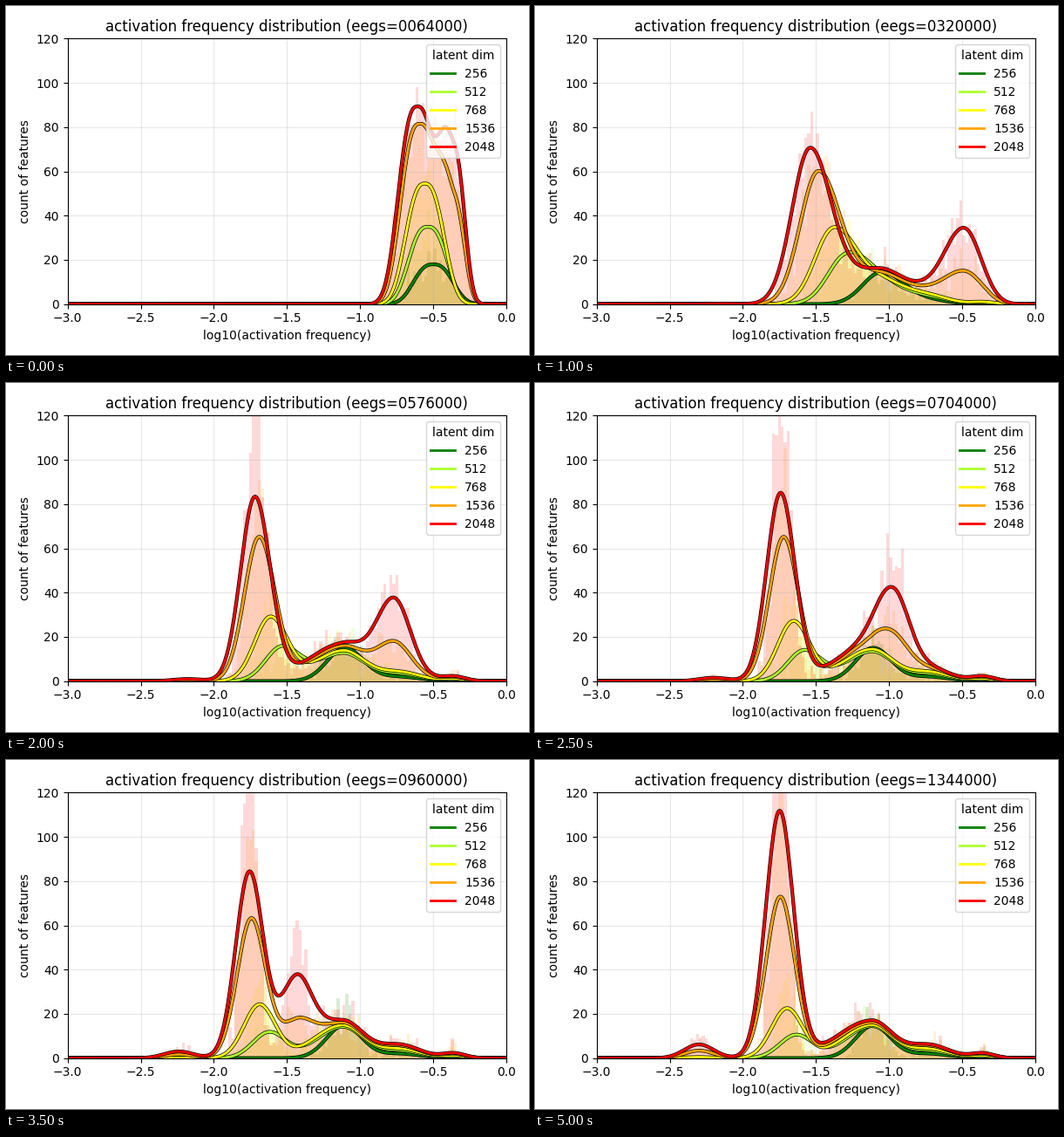
A matplotlib script for the animation above (5250 ms loop, 600 by 400 pixels).

```python
import numpy as np
import matplotlib.pyplot as plt
from matplotlib.animation import FuncAnimation

FRAMES, INTERVAL = 21, 250
EDGES = np.linspace(-3, 0, 151)
MIDS = (EDGES[:-1] + EDGES[1:]) / 2
X = np.linspace(-3, 0, 500)

# latent dim, colour, resting place and time constant of the main cluster,
# its area at start and end, height of the middle and the late cluster
SERIES = [
    (256, "green", -1.11, 1.7, 2.3, 1.75, 0, (0, 0)),
    (512, "greenyellow", -1.64, 3.4, 4.4, 1.1, 14.5, (0, 0)),
    (768, "yellow", -1.70, 3.1, 6.8, 2.3, 15, (0, 0)),
    (1536, "orange", -1.75, 2.7, 10.0, 5.9, 16, (46, 12)),
    (2048, "red", -1.76, 2.4, 10.9, 7.7, 17, (70, 31)),
]


def decay(start, end, t, tau):
    return end + (start - end) * np.exp(-t / tau)


def clusters(series, t):
    """Centre, height, left and right width of every cluster at step t."""
    n, _, rest, tau, area0, area1, mid, late = series
    size = np.log2(n / 256) / 3

    base = .12 - .026 * size
    left = base + (.13 - base) * np.exp(-((t - 2) / 4) ** 2)
    right = left + .04 * t * np.exp(-t / 2)
    main = (decay(-.5 - .11 * size, rest, t, tau),
            2 * decay(area0, area1, t, 5) / (left + right), left, right)

    middle = (decay(-.5, -1.12, t, 1.6),
              decay(0, mid, t, 5 - 3.5 * size),
              .15 + .08 * size, decay(.24, .14, t, 3))

    # slow starter that joins the main cluster in the end
    drift = (-.37 - 1.35 * min(t / 16, 1) ** 1.75,
             decay(*late, t, 1.3),
             decay(.085, .14, t, 1) - .0025 * t,
             decay(.08, .115, t, 1) - .001 * t)

    tail = (-.73, decay(0, 2 + 4 * size, t, 2), .14, .14)
    edge = (-.36, decay(0, 2.2 * size, t, 2), .08, .08)
    rare = (-2.1 - .01 * t, 6.2 * (t / 20) ** 2 * size ** 4, .1, .1)
    return main, middle, drift, tail, edge, rare


def density(series, x, t, blur=0):
    """Sum of the clusters; blur is the smoothing width to take out again."""
    power = 2 + .6 * np.exp(-t)  # flatter tops at the very start

    def sharpen(w):
        return np.sqrt(max(w * w - blur * blur, .025 ** 2))

    total = np.zeros_like(x)
    for center, height, left, right in clusters(series, t):
        l, r = sharpen(left), sharpen(right)
        z = np.abs(x - center) / np.where(x < center, l, r)
        total += height * (left + right) / (l + r) * np.exp(-.5 * z ** power)
    return total


fig, ax = plt.subplots(figsize=(6, 4), dpi=100)
artists = []
for series in SERIES:
    label, color = series[:2]
    bars = ax.stairs(np.zeros(len(MIDS)), EDGES, fill=True, color=color,
                     alpha=.15, lw=0)
    outline, = ax.plot(X, 0 * X, color="black", lw=3)
    line, = ax.plot(X, 0 * X, color=color, lw=2, label=str(label))
    artists.append((series, bars, outline, line))

ax.set_xlim(-3, 0)
ax.set_ylim(0, 120)
ax.grid(alpha=.3)
ax.set_xlabel("log10(activation frequency)")
ax.set_ylabel("count of features")
title = ax.set_title("activation frequency distribution (eegs=0064000)")
ax.legend(title="latent dim", loc="upper right")
fig.tight_layout()


def update(t):
    rng = np.random.default_rng(100 + t)
    blur = decay(0, .08, t, 4)
    for series, bars, outline, line in artists:
        bars.set_data(rng.poisson(density(series, MIDS, t, blur)).astype(float))
        y = density(series, X, t)
        outline.set_ydata(y)
        line.set_ydata(y)
    title.set_text("activation frequency distribution "
                   f"(eegs={64000 * (t + 1):07d})")
    return []


anim = FuncAnimation(fig, update, frames=FRAMES, interval=INTERVAL,
                     init_func=lambda: update(0), repeat=True, repeat_delay=0)
plt.show()
```
